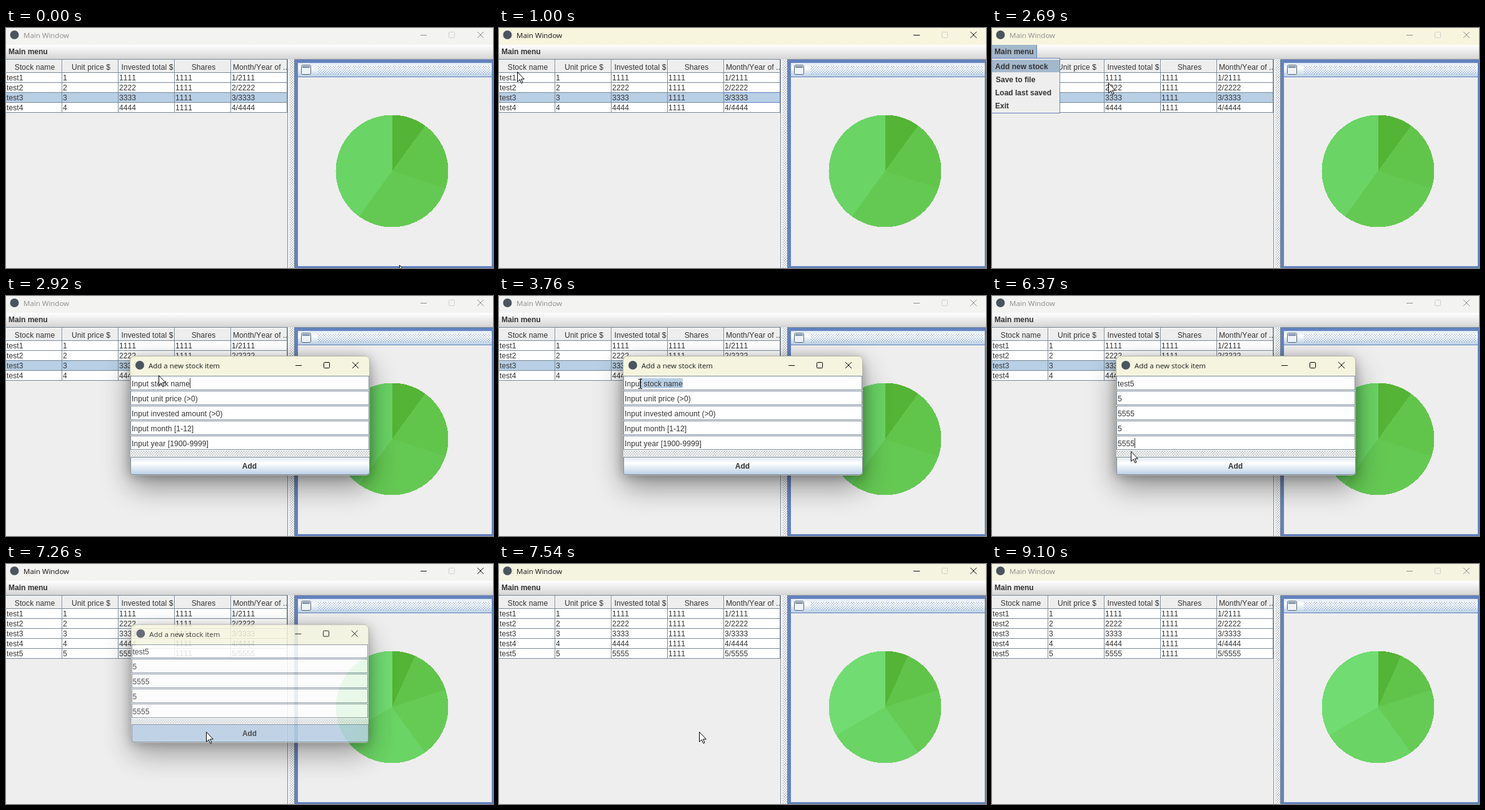
An HTML page that plays this animation: 779 px wide and 385 px high, repeating every 9170 ms.

```html
<!DOCTYPE html>
<html lang="en">
<head>
<meta charset="utf-8">
<title>Main Window</title>
<style>
html, body { margin: 0; width: 100%; height: 100%; overflow: hidden; background: #eee; }
svg { display: block; width: 779px; height: 385px; }
text { font: 12px "Liberation Sans", Arial, sans-serif; font-kerning: none; letter-spacing: .1px; fill: #333; }
text.bold { font-weight: bold; letter-spacing: 0; }
text.caption { font: 11.5px "Open Sans", "Noto Sans", sans-serif; letter-spacing: 0; fill: #1a1a1a; }
text.mid { text-anchor: middle; }
rect, .slice { shape-rendering: crispEdges; }
rect.round { shape-rendering: auto; }
</style>
</head>
<body>
<svg id="stage" viewBox="0 0 779 385" xmlns="http://www.w3.org/2000/svg">
<defs>
  <linearGradient id="bar" x2="0" y2="1"><stop stop-color="#fff"/><stop offset="1" stop-color="#d6d6d6"/></linearGradient>
  <linearGradient id="ocean" x2="0" y2="1">
    <stop stop-color="#dde8f3"/><stop offset=".35" stop-color="#fff"/><stop offset="1" stop-color="#b8cfe5"/>
  </linearGradient>
  <pattern id="bumps" x="453" y="50" width="4" height="4" patternUnits="userSpaceOnUse">
    <path d="M0 0h1v1h-1zM2 2h1v1h-1z" fill="#fff"/><path d="M1 1h1v1h-1zM3 3h1v1h-1z" fill="#7a8a99"/>
  </pattern>
  <pattern id="blueBumps" x="498" y="60" width="4" height="4" patternUnits="userSpaceOnUse">
    <path d="M0 0h1v1h-1zM2 2h1v1h-1z" fill="#fff"/><path d="M1 1h1v1h-1zM3 3h1v1h-1z" fill="#6382bf"/>
  </pattern>
  <filter id="soft" x="-30%" y="-60%" width="160%" height="240%"><feGaussianBlur stdDeviation="23"/></filter>
  <filter id="near" x="-10%" y="-20%" width="120%" height="140%"><feGaussianBlur stdDeviation="8"/></filter>
  <clipPath id="frame"><rect class="round" x="198" y="96" width="384" height="192" rx="7"/></clipPath>
</defs>
</svg>
<script>
const LOOP = 9170;
const GRID = '#7a8a99', BLUE = '#6382bf', PICK = '#b8cfe5', MENU = '#a3b8cc', FACE = '#eee';
const stage = document.getElementById('stage');

const rect = (x, y, w, h, fill, more = '') =>
  `<rect x="${x}" y="${y}" width="${w}" height="${h}" fill="${fill}" ${more}/>`;
const box = (x, y, w, h, stroke, more = '') =>
  rect(x + .5, y + .5, w - 1, h - 1, 'none', `stroke="${stroke}" ${more}`);
const text = (x, y, s, cls = '', more = '') =>
  `<text x="${x}" y="${y}" class="${cls}" ${more}>${s}</text>`;
const icon = (x, y) => `<circle cx="${x}" cy="${y}" r="7" fill="#4a5560"/>`;
const group = (id, body, more = '') => `<g id="${id}" ${more}>${body}</g>`;

// Minimise, maximise and close signs
const signs = (x, y, dim) =>
  `<g fill="none" stroke="currentColor"><path d="M${x - 5} ${y + .5}h10"/>` +
  `<rect x="${x + 40.5}" y="${y - 4.5}" width="9" height="9" rx="1" class="round"${dim ? ' stroke="#cfcfcb"' : ''}/>` +
  `<path d="M${x + 86} ${y - 5}l10 10m0-10l-10 10"/></g>`;

function pie(n, colors) {
  const total = n * (n + 1) / 2, cx = 617.5, cy = 229.5, r = 90;
  const at = a => `${cx + r * Math.sin(a)} ${cy - r * Math.cos(a)}`;
  let a = 0, out = '';
  for (let i = 1; i <= n; i++) {
    const b = a + 2 * Math.PI * i / total;
    out += `<path class="slice" d="M${cx} ${cy}L${at(a)}A${r} ${r} 0 0 1 ${at(b)}z" fill="${colors[i - 1]}"/>`;
    a = b;
  }
  return out;
}

const heads = ['Stock name', 'Unit price $', 'Invested total $', 'Shares', 'Month/Year of ...'];

function tableRow(n) {
  const y = 56 + 16 * n, four = String(n).repeat(4);
  const cells = ['test' + n, n, four, '1111', n + '/' + (n === 1 ? '2111' : four)];
  return rect(0, y, 450, 16, '#fff') + (n === 3 ? rect(0, y, 450, 16, PICK, 'id="picked"') : '') +
    rect(0, y + 15, 450, 1, GRID) +
    cells.map((s, i) => rect(90 * i + 89, y, 1, 16, GRID) + text(90 * i + 1, y + 12, s)).join('');
}

function mainWindow() {
  let s = rect(0, 0, 779, 385, FACE) + rect(0, 0, 779, 27, '#f3f3f3', 'id="titleBar"') + icon(13.5, 11) +
    group('caption', text(28, 16, 'Main Window', 'caption', 'style="fill:currentColor"') + signs(668, 11, true)) +
    rect(0, 27, 779, 22, 'url(#bar)') + rect(0, 49, 779, 1, '#ccc') +
    group('menuTab', rect(0, 27, 72, 21, MENU) + rect(71, 27, 1, 21, BLUE)) +
    text(4, 42, 'Main menu', 'bold');
  s += rect(0, 50, 451, 1, GRID) + rect(0, 71, 450, 1, GRID);
  heads.forEach((h, i) => {
    s += rect(90 * i, 51, 89, 1, '#fff') + rect(90 * i, 51, 1, 20, '#fff') + rect(90 * i + 89, 51, 1, 21, GRID);
    s += i < 4 ? text(90 * i + 46, 67, h, 'mid') : text(363, 67, h);
  });
  for (let n = 1; n < 5; n++) s += tableRow(n);
  s += group('row5', tableRow(5)) + box(359, 103, 91, 17, BLUE, 'id="cell"');
  s += rect(450, 50, 1, 335, GRID) + rect(451, 51, 1, 334, '#fff') + rect(453, 50, 8, 335, 'url(#bumps)');
  s += rect(461, 50, 318, 335, GRID) + rect(462, 51, 317, 334, BLUE) + rect(467, 56, 310, 22, 'url(#ocean)') +
    rect(498, 60, 277, 14, 'url(#blueBumps)') + rect(467, 78, 310, 1, BLUE) + rect(467, 79, 310, 303, FACE) +
    `<rect x="472.5" y="59.5" width="15" height="15" rx="2" fill="#eef3f8" stroke="#555f6b" class="round"/>` +
    rect(474, 61, 12, 3, '#7d93ad');
  s += group('pieOld', pie(4, ['#54b435', '#62c54b', '#64c953', '#6ad465'])) +
    group('pieNew', pie(5, ['#54b435', '#61c44a', '#65cb55', '#6ad464', '#71dc71']));
  return s;
}

const items = ['Add new stock', 'Save to file', 'Load last saved', 'Exit'];
const popup = () => group('popup', rect(0, 48, 109, 89, FACE) + box(-1, 48, 110, 89, BLUE) +
  rect(0, 51, 108, 20, MENU, 'id="hot"') +
  items.map((s, i) => text(i === 1 ? 6 : 5, 66 + 21 * i, s, 'bold')).join(''));

const hints = ['Input stock name', 'Input unit price (&gt;0)', 'Input invested amount (&gt;0)',
  'Input month [1-12]', 'Input year [1900-9999]'];

function dialog() {
  let s = rect(198, 96, 384, 192, FACE) + rect(198, 96, 384, 32, '#f5f5df') + icon(214, 111) +
    text(228, 116, 'Add a new stock item', 'caption') + signs(468, 111);
  hints.forEach((h, i) => {
    const y = 128 + 24 * i;
    s += rect(199, y, 383, 24, '#fff') + box(199, y, 382, 23, GRID);
    if (!i) s += rect(201, 132, 0, 16, PICK, 'id="marked"');
    s += text(201, y + 17, h, '', `id="field${i}"`);
  });
  s += rect(201, 132, 1, 16, '#333', 'id="caret"') + rect(199, 249, 382, 8, 'url(#bumps)') +
    rect(199, 258, 383, 29, 'url(#ocean)', 'id="button"') + box(199, 258, 383, 29, GRID) +
    box(200, 259, 381, 27, PICK, 'id="hover"') + text(389.5, 277, 'Add', 'bold mid');
  return group('dialog',
    rect(198, 114, 384, 192, '#000', 'class="round" rx="8" opacity=".4" filter="url(#soft)"') +
    rect(198, 98, 384, 192, '#000', 'class="round" rx="8" opacity=".24" filter="url(#near)"') +
    `<g clip-path="url(#frame)">${s}</g>` +
    box(198, 96, 384, 192, '#8a8a86', 'class="round" rx="7" opacity=".6"'));
}

const pointer = group('arrow',
  '<path d="M.5 .5V16.2L4.2 12.8L6.8 18.6L9 17.6L6.5 12H11.3z" fill="#fff" stroke="#000"/>') +
  group('beam', '<path d="M2 1.5h2.5m1 0h2.5M5 2v14M2 16.5h2.5m1 0h2.5" fill="none" stroke="#000"/>');

stage.insertAdjacentHTML('beforeend', mainWindow() + popup() + dialog() + pointer);

const $ = id => document.getElementById(id);
const show = (id, on) => $(id).setAttribute('visibility', on ? 'inherit' : 'hidden');
const set = (id, name, value) => $(id).setAttribute(name, value);

// Pointer moves: first change, last change, number of steps, from, to
const moves = [
  [70, 930, 13, 629, 380, 31, 76],
  [1000, 1200, 4, 28.3, 80, 33, 40],
  [1480, 1480, 1, 33, 40, 33, 39],
  [1950, 2140, 4, 33, 39, 62, 60],
  [2350, 2690, 6, 62, 60, 186, 88],
  [2760, 2920, 3, 186, 88, 244, 127],
  [3200, 3480, 5, 244, 127, 314, 140],
  [3550, 3950, 6, 314, 140, 137, 141],
  [4020, 4090, 2, 137, 141, 147, 142],
  [5500, 6370, 13, 147, 142, 222, 249],
  [6440, 6510, 2, 222, 249, 224, 264],
  [6710, 6840, 3, 224, 264, 320, 269],
  [8070, 8490, 7, 320, 269, 613, 385]
];

function pointerAt(t) {
  let pos = [629, 380];
  for (const [a, b, n, x0, y0, x1, y1] of moves) {
    if (t < a) break;
    const done = n > 1 ? Math.min(n, Math.floor((t - a) * (n - 1) / (b - a) + 1e-6) + 1) : 1;
    pos = [x0 + (x1 - x0) * done / n, y0 + (y1 - y0) * done / n].map(Math.round);
  }
  return pos;
}

// Last value whose time has come
const latest = (t, list) => list.reduce((v, [at, value]) => t >= at ? value : v, list[0][1]);

const typed = [
  [[0, hints[0]], [4640, 't'], [4770, 'te'], [4900, 'test'], [5030, 'test5']],
  [[0, hints[1]], [5640, '5']],
  [[0, hints[2]], [5790, '5'], [5860, '5555']],
  [[0, hints[3]], [6010, '5']],
  [[0, hints[4]], [6230, '5'], [6300, '5555']]
];
const opacity = [[0, 0], [2760, .35], [2850, .8], [2920, 1], [7260, .85], [7340, .45], [7410, .15], [7470, .03], [7540, 0]];
const scale = [[0, .94], [2760, .95], [2850, .985], [2920, 1], [7260, .992], [7340, .975], [7410, .96]];
const shown = {};

function drawDialog(t, x) {
  const k = latest(t, scale);
  set('dialog', 'opacity', latest(t, opacity));
  set('dialog', 'transform', `translate(390 192) scale(${k}) translate(-390 -192)`);
  typed.forEach((list, i) => {
    const s = latest(t, list);
    if (shown[i] !== s) $('field' + i).innerHTML = shown[i] = s;
  });

  const dragging = t >= 3550 && t < 4640;
  const end = 201 + $('field0').getComputedTextLength();
  const left = Math.max(201, Math.min(end, t < 3950 ? x : 0));
  set('marked', 'x', left);
  set('marked', 'width', dragging ? end - left : 0);

  const row = latest(t, [[0, 0], [5570, 1], [5720, 2], [5930, 3], [6150, 4]]);
  const caret = dragging ? left : 201 + $('field' + row).getComputedTextLength();
  set('caret', 'x', Math.round(caret));
  set('caret', 'y', 132 + 24 * row);
  show('caret', !(t >= 4290 && t < 4640) && t < 6840);
  set('button', 'fill', t >= 7120 ? PICK : 'url(#ocean)');
  show('hover', t >= 6510);
}

function draw(t) {
  const [x, y] = pointerAt(t);
  const active = t >= 140 && t < 2690 || t >= 7190 && t < 9100;
  const warm = t >= 140 && t < 2760 || t >= 7340;
  const menu = t >= 1620 && t < 2760;
  const added = t >= 7190;
  const open = t >= 2760 && t < 7540;

  set('titleBar', 'fill', warm ? (t < 2760 ? '#f8f5df' : '#f4f4e1') : '#f3f3f1');
  set('caption', 'color', active ? '#111' : '#8c8c8a');
  show('menuTab', menu);
  show('popup', menu);
  show('hot', t >= 1950);
  show('cell', t >= 140 && t < 1620);
  show('picked', !added);
  show('row5', added);
  show('pieOld', !added);
  show('pieNew', added);
  show('dialog', open);
  if (open) drawDialog(t, x);

  const inField = open && x >= 199 && x < 581 && y >= 128 && y < 248;
  show('arrow', !inField);
  show('beam', inField);
  set('arrow', 'transform', `translate(${x} ${y})`);
  set('beam', 'transform', `translate(${x - 5} ${y - 9})`);
}

const start = performance.now();
function tick() {
  draw((performance.now() - start) % LOOP);
  requestAnimationFrame(tick);
}
tick();
</script>
</body>
</html>
```
